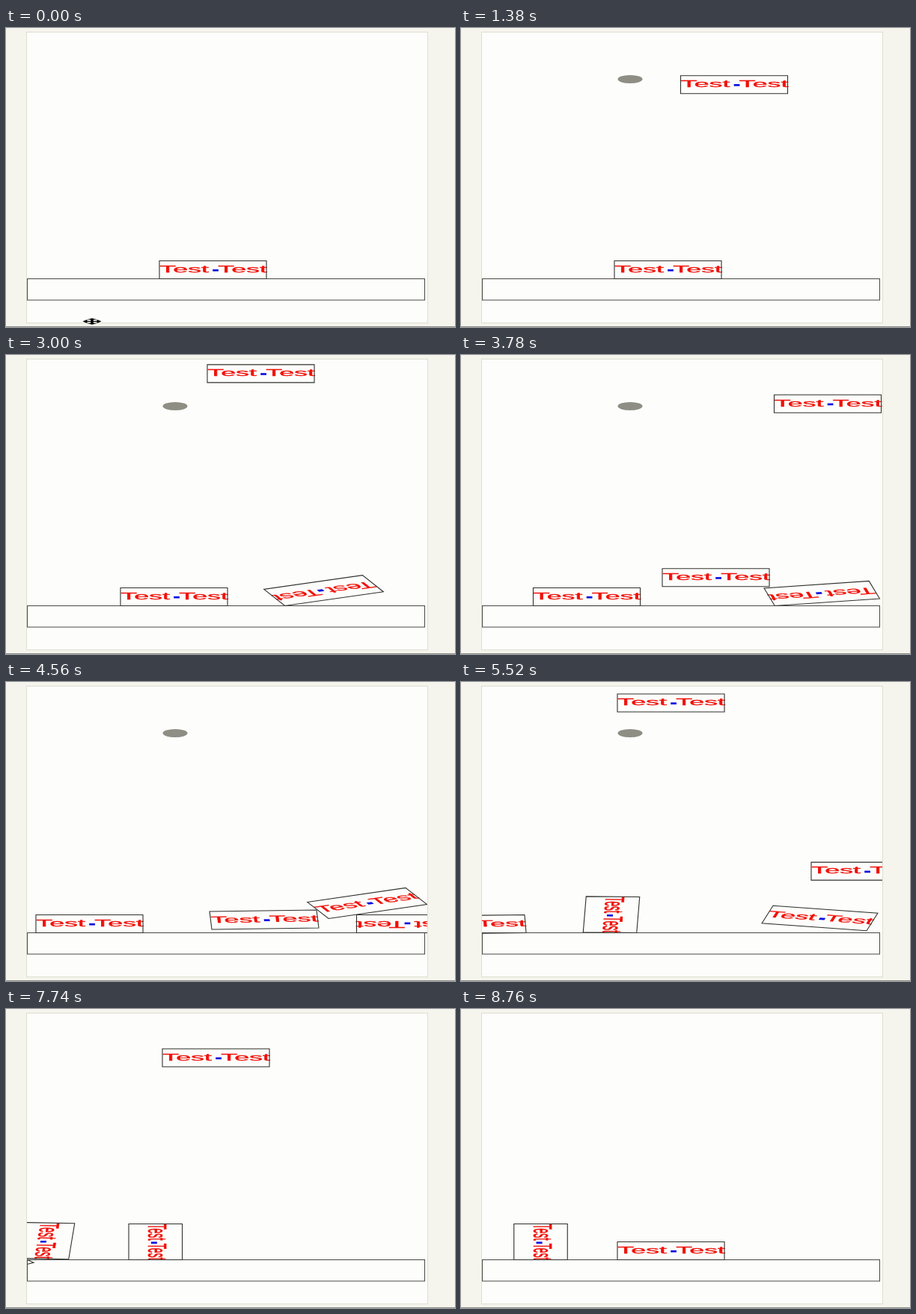
Write an HTML page with a canvas that moves like this. It is 600 px wide and 400 px high and loops after 8820 ms.

```html
<!DOCTYPE html>
<html lang="en">
<head>
<meta charset="utf-8">
<title>Falling boxes</title>
<style>
html, body { margin: 0; width: 100%; height: 100%; overflow: hidden; background: #f5f5ee; }
canvas { display: block; }
</style>
</head>
<body>
<canvas id="stage" width="600" height="400"></canvas>
<script>
const ctx = document.getElementById('stage').getContext('2d');
const LOOP = 8820, STEP = 60;
const STRETCH = 2.98;             // the whole scene is widened
const GRAVITY = 593e-6;           // px per ms squared
const TOP = 13, GROUND = 335.5;
const LEFT = 28, RIGHT = 560;     // platform ends
const HALF_W = 24, HALF_H = 12;

// A box drops at x from time `at` and lands `lift` above the ground.
// Knocks that follow: [time, x, turn in degrees, lift].
const boxes = [
  { x: 276.5, at: -2000, knocks: [[1900, 276.5], [2220, 274, 8.4], [3000, 224.5], [4560, 111.5], [5520, 14.5]] },
  { x: 365, at: 920, lift: 24, knocks: [[2220, 377.5, 31.6, 9.7], [3000, 424.5, 157], [4560, 540, 180], [5400, 640, 180]] },
  { x: 340.5, at: 2800, knocks: [[4400, 342], [4560, 345, -2.4, 4.5], [5520, 201, 91.6], [6840, 61.5, 90]] },
  { x: 490, at: 3360, lift: 24, knocks: [[4560, 482.5, -23.4, 19], [5520, 479.5, 12, 2.8], [6780, 640]] },
  { x: 539.5, at: 4620, lift: 24, knocks: [[6420, 640, 20]] },
  { x: 280.5, at: 5295, lift: 12, knocks: [[6840, 281, -106, 24], [7300, 240, -270], [8760, 106.5, -270]] },
  { x: 172, at: 5535, lift: 48, knocks: [[6840, 161, 97, 1.7], [8500, -40, 90]] },
  { x: 280.5, at: 7320, knocks: [] }
];

const mix = (a, b, k) => a + (b - a) * k;

// Centre height of a turned box whose lowest corner touches the ground.
function restY(deg) {
  const r = deg * Math.PI / 180;
  return GROUND - HALF_W * Math.abs(Math.sin(r)) - HALF_H * Math.abs(Math.cos(r));
}

function poseAt({ x, at, lift = 0, knocks }, t) {
  if (t < at) return null;
  const fall = TOP + GRAVITY / 2 * (t - at) ** 2;
  const landY = restY(0) - lift;
  if (fall < landY) return { x, y: fall, deg: 0 };
  if (!knocks.length) return { x, y: landY, deg: 0 };

  const landing = at + Math.sqrt(2 * (landY - TOP) / GRAVITY);
  const keys = [[landing, x, 0, lift], ...knocks];
  const next = keys.findIndex(key => key[0] > t);
  const i = next < 0 ? keys.length - 1 : next;
  const [t0, x0, deg0 = 0, lift0 = 0] = keys[i - 1];
  const [t1, x1, deg1 = 0, lift1 = 0] = keys[i];
  const k = (t - t0) / (t1 - t0), held = Math.min(k, 1);
  const px = mix(x0, x1, k), deg = mix(deg0, deg1, held);

  // Past an end of the platform the box tips over.
  const over = Math.max(0, px - RIGHT) + Math.min(0, px - LEFT);
  return {
    x: px,
    y: restY(deg) - mix(lift0, lift1, held) + 0.004 * over * over,
    deg: deg + 0.0093 * over * Math.abs(over)
  };
}

function drawLabel(text, x) {
  ctx.fillText(text, x, 3.2);
  ctx.strokeText(text, x, 3.2);
}

function drawBox({ x, y, deg }) {
  ctx.save();
  ctx.translate(x, y);
  ctx.scale(STRETCH, 1);
  ctx.rotate(deg * Math.PI / 180);
  ctx.beginPath();
  ctx.rect(-HALF_W, -HALF_H, 2 * HALF_W, 2 * HALF_H);
  ctx.fillStyle = ctx.strokeStyle = '#f01008';
  ctx.lineWidth = 0.3;
  drawLabel('Test', -23.9);
  drawLabel('Test', 2.3);
  ctx.fillStyle = '#1010e0';
  ctx.fillRect(-0.1, -0.7, 2.6, 2.7);
  ctx.restore();
  // Outline drawn unscaled so that every side has the same weight.
  ctx.lineWidth = 1.1;
  ctx.strokeStyle = '#30302c';
  ctx.stroke();
}

function drawPanel() {
  ctx.fillStyle = '#f5f5ee';
  ctx.fillRect(0, 0, 600, 400);
  ctx.fillStyle = '#fdfdfb';
  ctx.fillRect(27, 5, 537, 390);
  ctx.strokeStyle = '#dedece';
  ctx.lineWidth = 1;
  ctx.strokeRect(27.5, 5.5, 536, 389);
  ctx.fillStyle = '#8c8c88';
  ctx.fillRect(0, 399, 600, 1);
}

function drawPlatform() {
  ctx.lineWidth = 1;
  ctx.strokeStyle = '#484844';
  ctx.strokeRect(LEFT + 0.5, GROUND, RIGHT - LEFT - 1, 28.5);
}

function drawBall() {
  ctx.fillStyle = '#8e8e84';
  ctx.beginPath();
  ctx.ellipse(226, 68.5, 16.5, 5.5, 0, 0, Math.PI * 2);
  ctx.fill();
}

function drawCursor(x, y) {
  ctx.save();
  ctx.translate(x, y);
  ctx.scale(STRETCH, 1);
  ctx.fillStyle = '#000';
  for (let i = 0; i < 4; i++) {
    ctx.beginPath();
    ctx.moveTo(4.2, 0);
    ctx.lineTo(2.2, -2.4);
    ctx.lineTo(2.2, 2.4);
    ctx.fill();
    ctx.fillRect(0, -0.6, 2.5, 1.2);
    ctx.rotate(Math.PI / 2);
  }
  ctx.restore();
}

function draw(t) {
  drawPanel();
  ctx.save();
  ctx.beginPath();
  ctx.rect(28, 6, 535, 388);
  ctx.clip();
  ctx.font = '12px "Liberation Sans", Arial, sans-serif';
  if (t >= 1080 && t < 6180) drawBall();
  drawPlatform();
  for (const box of boxes) {
    const pose = poseAt(box, t);
    if (pose) drawBox(pose);
  }
  ctx.restore();
  if (t < 480) drawCursor(115, 392.5);
}

const start = performance.now();
function tick() {
  const t = (performance.now() - start) % LOOP;
  draw(Math.floor(t / STEP) * STEP);
  requestAnimationFrame(tick);
}
tick();
</script>
</body>
</html>
```
